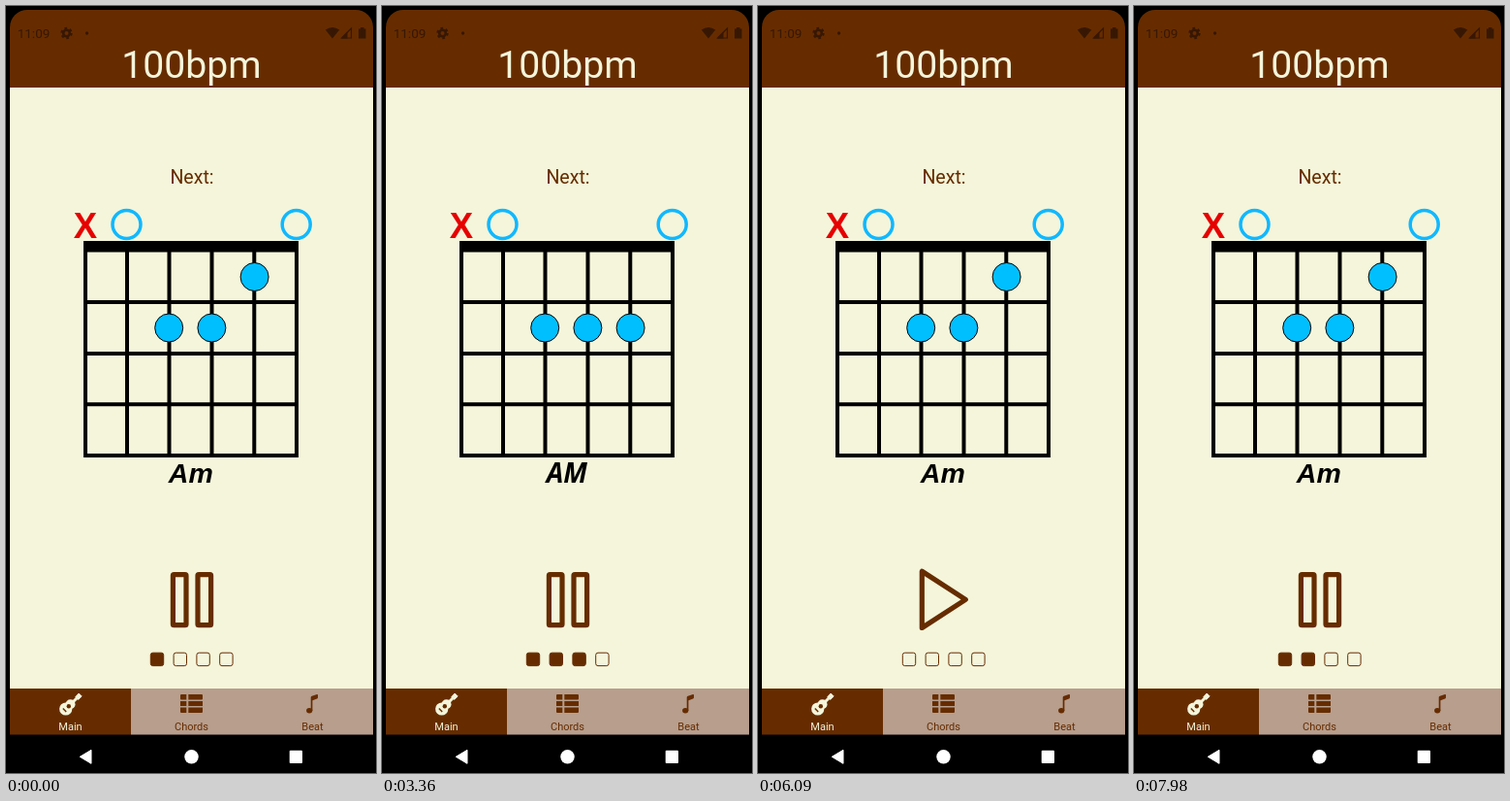
Write an HTML page that moves like this. It is 382x790 px and loops after 8 s.

```html
<!DOCTYPE html>
<html lang="en">
<head>
<meta charset="utf-8">
<title>Chord metronome</title>
<style>
  :root { --brown: #662c00; --cream: #f4f5da; --blue: #00bfff; --dim: #371703; }
  html, body { margin: 0; width: 100%; height: 100%; overflow: hidden; background: #000; }
  svg { display: block; width: 382px; height: 790px; }
  text { font-family: Roboto, sans-serif; text-anchor: middle; }

  .status { fill: var(--dim); }
  .grid { fill: none; stroke: #000; stroke-width: 4; }
  .open { fill: none; stroke: #10b8ff; stroke-width: 3.5; }
  .dot { fill: var(--blue); stroke: #000; stroke-width: 1; }
  .name { font-weight: 700; font-style: italic; }
  .control { fill: none; stroke: var(--brown); stroke-width: 5.2; stroke-linejoin: round; }
  .beats rect { fill: var(--brown); stroke: var(--brown); }
  .tab { font-size: 11px; }

  .anim, .beats rect { animation: 8s step-end infinite; }
  .minor { animation-name: minor; }
  .major { animation-name: major; }
  .pause { animation-name: pause; }
  .play { animation-name: play; }
  .beats rect:nth-child(1) { animation-name: beat1; }
  .beats rect:nth-child(2) { animation-name: beat2; }
  .beats rect:nth-child(3) { animation-name: beat3; }
  .beats rect:nth-child(4) { animation-name: beat4; }

  /* Chords swap every four beats of 560 ms. */
  @keyframes minor {
    0%, 53.375%, 100% { opacity: 1; }
    25.375% { opacity: 0; }
  }
  @keyframes major {
    0%, 53.375%, 100% { opacity: 0; }
    25.375% { opacity: 1; }
  }

  /* Beats fill up one after another and clear on stop. */
  @keyframes beat1 {
    0%, 87.5%, 100% { fill-opacity: 1; }
    63% { fill-opacity: 0; }
  }
  @keyframes beat2 {
    0%, 25.375%, 53.375%, 63% { fill-opacity: 0; }
    4.375%, 32.375%, 60.375%, 94.5%, 100% { fill-opacity: 1; }
  }
  @keyframes beat3 {
    0%, 25.375%, 53.375%, 100% { fill-opacity: 0; }
    11.375%, 39.375% { fill-opacity: 1; }
  }
  @keyframes beat4 {
    0%, 25.375%, 53.375%, 100% { fill-opacity: 0; }
    18.375%, 46.375% { fill-opacity: 1; }
  }

  /* A press dims the button; on release the icon swaps and eases back. */
  @keyframes pause {
    0% { opacity: 1; }
    61.25% { opacity: .2; }
    63% { opacity: 0; }
    80.5% { opacity: .2; }
    81.375% { opacity: .29; }
    82.25% { opacity: .63; }
    83.125% { opacity: .94; }
    84%, 100% { opacity: 1; }
  }
  @keyframes play {
    0% { opacity: 0; }
    63% { opacity: .21; }
    63.875% { opacity: .41; }
    64.75% { opacity: .79; }
    65.625% { opacity: 1; }
    79.625% { opacity: .2; }
    80.5%, 100% { opacity: 0; }
  }
</style>
</head>
<body>
<svg viewBox="0 0 382 790">
  <rect width="382" height="790" fill="#000"/>

  <!-- screen and header -->
  <path d="M4 84V22A18 18 0 0 1 22 4H361A18 18 0 0 1 379 22V84Z" fill="var(--brown)"/>
  <rect x="4" y="84" width="375" height="619" fill="var(--cream)"/>
  <text x="191.5" y="74" font-size="39.2" fill="var(--cream)">100bpm</text>

  <!-- status bar -->
  <g class="status">
    <text x="28.5" y="33" font-size="13.5">11:09</text>
    <circle cx="62.5" cy="28" r="3.3" fill="none" stroke="var(--dim)" stroke-width="2.6"/>
    <circle cx="62.5" cy="28" r="5.2" fill="none" stroke="var(--dim)" stroke-width="2" stroke-dasharray="2.7 2.745"/>
    <circle cx="83.5" cy="28" r="1.7"/>
    <path d="M337 33.5L329.8 24.6Q337 19.4 344.2 24.6Z"/>
    <path d="M346.5 33L356.5 23V33Z" fill="none" stroke="var(--dim)" stroke-width="1.2"/>
    <path d="M346 33.5L352.5 27V33.5Z"/>
    <path d="M364 23.5H366V22H369.5V23.5H371.5V33.5H364Z"/>
  </g>

  <text x="192" y="183" font-size="19.6" fill="var(--brown)">Next:</text>

  <!-- chord diagram -->
  <text x="82" y="238.5" font-size="36.5" font-weight="700" fill="#e60000" style="font-family:'Liberation Sans',Arial,sans-serif">X</text>
  <circle class="open" cx="124.5" cy="225" r="14.5"/>
  <circle class="open" cx="299.7" cy="225" r="14.5"/>
  <rect x="80" y="242" width="222" height="11.5"/>
  <path class="grid" d="M82 250V463H300V250M125 250V463M168.5 250V463M212.5 250V463M256.3 250V463M82 305H300M82 358H300M82 410.3H300"/>
  <circle class="dot" cx="168.2" cy="331.5" r="14.5"/>
  <circle class="dot" cx="212.4" cy="331.5" r="14.5"/>
  <g class="anim minor">
    <circle class="dot" cx="256.6" cy="279" r="14.5"/>
    <text class="name" x="190.8" y="491" font-size="28.5" style="font-family:'Liberation Sans',Arial,sans-serif">Am</text>
  </g>
  <g class="anim major">
    <circle class="dot" cx="256.6" cy="331.5" r="14.5"/>
    <text class="name" x="190.8" y="491" font-size="28" style="font-family:'Open Sans',sans-serif">AM</text>
  </g>

  <!-- transport -->
  <g class="control anim pause">
    <rect x="172.4" y="585.7" width="13.6" height="52" rx="1"/>
    <rect x="198" y="585.7" width="13.6" height="52" rx="1"/>
  </g>
  <path class="control anim play" d="M169.3 582.3V640.5L214.3 611.4Z"/>
  <g class="beats">
    <rect x="149.3" y="666.2" width="13.4" height="13.4" rx="2.3"/>
    <rect x="173.1" y="666.2" width="13.4" height="13.4" rx="2.3"/>
    <rect x="196.9" y="666.2" width="13.4" height="13.4" rx="2.3"/>
    <rect x="220.7" y="666.2" width="13.4" height="13.4" rx="2.3"/>
  </g>

  <!-- tabs -->
  <rect x="4" y="703" width="125" height="47.5" fill="var(--brown)"/>
  <rect x="129" y="703" width="250" height="47.5" fill="#b79e8d"/>
  <g fill="var(--cream)">
    <circle cx="61.7" cy="724" r="6.6"/>
    <circle cx="66.5" cy="719.3" r="5"/>
    <path d="M66 720L73.5 712.5" stroke="var(--cream)" stroke-width="3"/>
    <path d="M71.8 711.6L75.2 708L78.2 711L74.6 714.4Z" stroke="var(--cream)" stroke-linejoin="round"/>
    <circle cx="64.8" cy="721.2" r="2.2" fill="var(--brown)"/>
    <path d="M58.8 723.6L62.2 727" stroke="var(--brown)" stroke-width="1.4"/>
    <text class="tab" x="66.5" y="745.5">Main</text>
  </g>
  <g fill="var(--brown)">
    <path d="M181 709H186.3V714.5H181Q180 714.5 180 713.5V710Q180 709 181 709ZM188.3 709H202Q203 709 203 710V713.5Q203 714.5 202 714.5H188.3ZM180 716H186.3V721H180ZM188.3 716H203V721H188.3ZM180 722.5H186.3V728H181Q180 728 180 727ZM188.3 722.5H203V727Q203 728 202 728H188.3Z"/>
    <ellipse cx="313.2" cy="725.8" rx="3.1" ry="2.7"/>
    <path d="M314.7 726V712.3Q314.7 711.2 315.8 710.8L321 709Q322 708.8 322 709.8V712.3Q322 713.2 321.1 713.5L316.4 715.2V726Z"/>
    <text class="tab" x="191.5" y="745.5">Chords</text>
    <text class="tab" x="316.5" y="745.5">Beat</text>
  </g>

  <!-- system navigation -->
  <g fill="#fff">
    <path d="M76.3 773.3L88 766.3V780.3Z" stroke="#fff" stroke-linejoin="round"/>
    <circle cx="191.5" cy="773.3" r="7.2"/>
    <rect x="292.7" y="766.7" width="13.3" height="13.3" rx="1"/>
  </g>
</svg>
</body>
</html>
```
